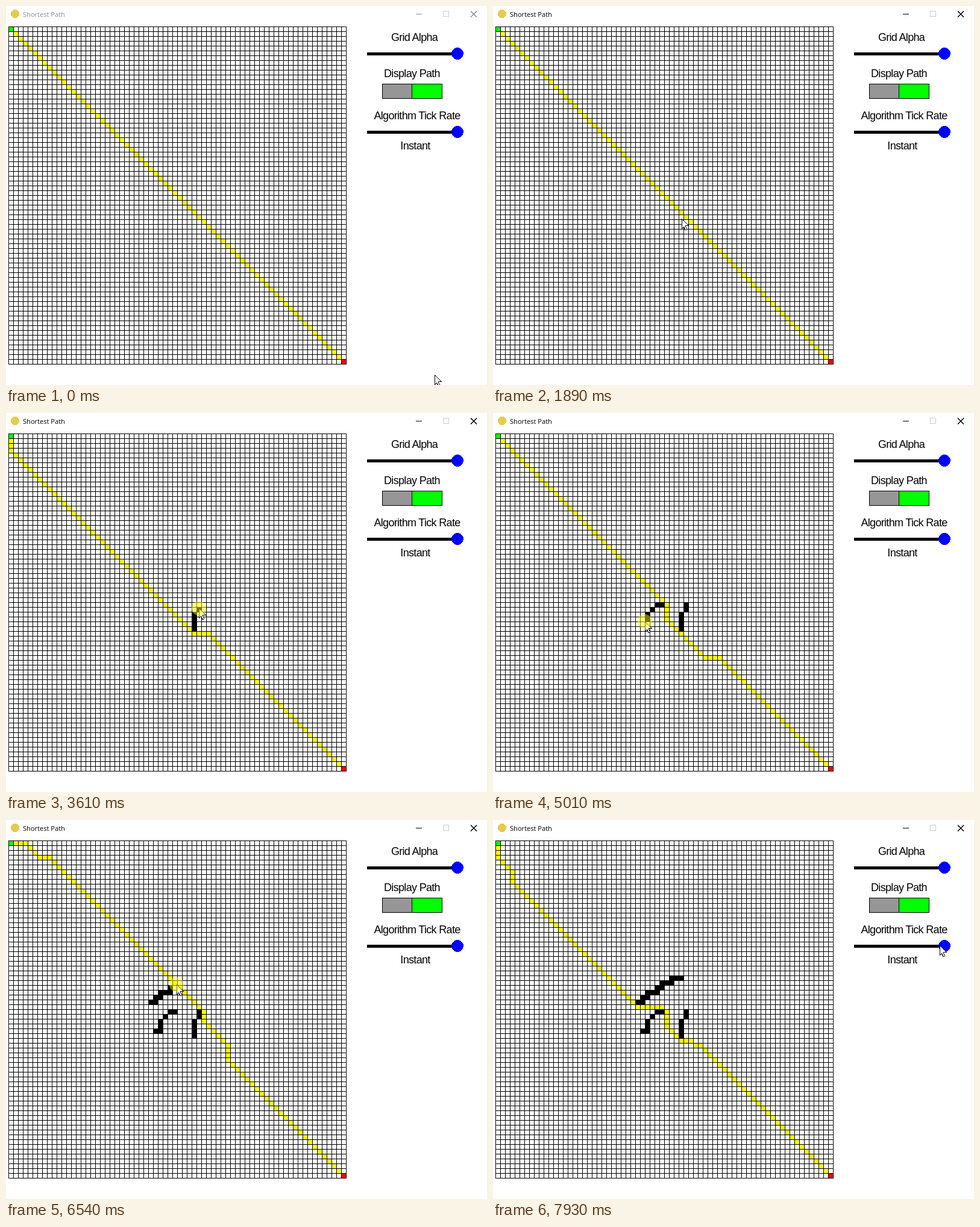
Recreate the animation shown at these times as an HTML page with a canvas. Size 798 by 629 pixels, loop 8000 ms.

```html
<!DOCTYPE html>
<html lang="en">
<head>
<meta charset="utf-8">
<title>Shortest Path</title>
<style>
  html, body { margin: 0; width: 798px; height: 629px; overflow: hidden; background: #fff; }
  svg, canvas { position: absolute; left: 0; top: 0; }
  svg { shape-rendering: crispEdges; }
  #bar { --ink: #000; }
  #bar.idle { --ink: #8c8c8c; }
  #title { font: 11.1px "Open Sans", "Noto Sans", sans-serif; fill: var(--ink); }
  #buttons { stroke: var(--ink); fill: none; }
  #labels { font: 18px "Liberation Sans", Arial, sans-serif; letter-spacing: -.68px; text-anchor: middle; }
  #halo { fill: rgba(255, 255, 0, .47); shape-rendering: auto; }
</style>
</head>
<body>
<canvas id="stage" width="798" height="629"></canvas>
<svg width="798" height="629">
  <g id="bar">
    <circle cx="15" cy="13" r="7" fill="#e6cb4c"/>
    <text id="title" x="28" y="18">Shortest Path</text>
    <g id="buttons">
      <path d="M680 13.5h10M771 8.5l10 10M781 8.5l-10 10"/>
      <rect x="725.5" y="8.5" width="9" height="9" stroke="#ccc"/>
    </g>
  </g>
  <g id="labels">
    <text x="677.5" y="58">Grid Alpha</text>
    <text x="673.5" y="118">Display Path</text>
    <text x="682" y="188">Algorithm Tick Rate</text>
    <text x="679" y="238">Instant</text>
  </g>
  <path d="M599 77h150v5h-150zM599 207h150v5h-150z"/>
  <circle cx="749" cy="79" r="10" fill="#00f"/>
  <circle cx="749" cy="209" r="10" fill="#00f"/>
  <g stroke="#000">
    <rect x="624.5" y="129.5" width="49" height="24" fill="#969696"/>
    <rect x="673.5" y="129.5" width="50" height="24" fill="#0f0"/>
  </g>
  <g id="pointer">
    <path d="M.5 .5v16l3-3 2.5 5h1.5l1-1-2-5v-1h5z" fill="#fff" stroke="#000"/>
    <circle id="halo" r="12"/>
  </g>
</svg>
<script>
const LOOP = 8000, LAST = 69, CELL = 8, LEFT = 4, TOP = 34;
const FOCUS = 1350, LAG = 130;
const $ = id => document.getElementById(id);
const g = $('stage').getContext('2d');

// Pointer key points: time, x, y
const keys = [
  [70, 711, 612], [870, 288, 352], [1020, 296, 362], [1350, 314, 353], [1890, 313, 353],
  [2230, 309, 358], [2430, 309, 358], [3050, 314, 344], [3458, 316, 330], [3610, 320, 324],
  [4030, 321, 316], [4430, 283, 318], [4603, 268, 322], [4723, 260, 330], [5010, 252, 346],
  [5250, 245, 353], [5640, 240, 303], [5770, 240, 303], [6540, 283, 273], [6880, 303, 262],
  [7140, 303, 262], [7680, 764, 226], [7930, 741, 208]
];

// Button held: from, to. The first press only focuses the window, the others draw walls.
const presses = [[FOCUS, 1620], [2430, 4030], [4430, 5300], [5770, 7160]];
const pressed = t => presses.some(([from, to]) => t >= from && t < to);

// Corners of the route once the given number of wall cells stands
const routes = [
  { walls: 0, corners: [] },
  { walls: 3, corners: [[1, 0], [39, 38], [39, 39]] },
  { walls: 4, corners: [[2, 0], [39, 37], [39, 39]] },
  { walls: 5, corners: [[0, 3], [38, 41], [41, 41]] },
  { walls: 9, corners: [[35, 35], [35, 38], [43, 46], [46, 46]] },
  { walls: 18, corners: [[3, 0], [6, 3], [8, 3], [40, 35], [40, 37], [45, 42], [45, 45]] },
  { walls: 23, corners: [[0, 3], [3, 6], [3, 8], [29, 34], [34, 34], [35, 35], [35, 38],
    [38, 41], [40, 41], [41, 42], [42, 42]] }
];

function pointer(t) {
  const i = keys.findIndex(k => k[0] > t);
  if (i <= 0) return keys.at(i).slice(1);
  const [t0, x0, y0] = keys[i - 1], [t1, x1, y1] = keys[i];
  let k = (t - t0) / (t1 - t0);
  if (!pressed(t)) k *= k * (3 - 2 * k);
  return [x0 + (x1 - x0) * k, y0 + (y1 - y0) * k];
}

// Every cell the held pointer crosses becomes a wall a moment later.
function traceWalls() {
  const walls = new Map();
  for (const [from, to] of presses.slice(1))
    for (let t = from; t < to; t += 5) {
      const [px, py] = pointer(t);
      const x = Math.floor((px - LEFT) / CELL), y = Math.floor((py - TOP) / CELL);
      const id = x + ',' + y;
      if (!walls.has(id)) walls.set(id, { x, y, time: t + LAG });
    }
  return [...walls.values()];
}
const walls = traceWalls();

function fillCell(x, y, color) {
  g.fillStyle = color;
  g.fillRect(LEFT + x * CELL, TOP + y * CELL, CELL + 1, CELL + 1);
}

function drawRoute(corners) {
  let x = 0, y = 0;
  for (const [cx, cy] of [...corners, [LAST, LAST]])
    while (x !== cx || y !== cy) {
      x += Math.sign(cx - x);
      y += Math.sign(cy - y);
      fillCell(x, y, '#ff0');
    }
  fillCell(0, 0, '#0f0');
  fillCell(LAST, LAST, '#f00');
}

function drawGrid() {
  const span = (LAST + 1) * CELL;
  g.fillStyle = '#000';
  for (let d = 0; d <= span; d += CELL) {
    g.fillRect(LEFT + d, TOP, 1, span + 1);
    g.fillRect(LEFT, TOP + d, span + 1, 1);
  }
}

function draw(now) {
  const t = now % LOOP;
  const standing = walls.filter(w => w.time <= t);
  g.clearRect(0, 0, 798, 629);
  drawRoute(routes.findLast(r => r.walls <= standing.length).corners);
  for (const w of standing) fillCell(w.x, w.y, '#000');
  drawGrid();
  $('bar').classList.toggle('idle', t < FOCUS);
  $('pointer').setAttribute('transform', `translate(${pointer(t).map(Math.round)})`);
  $('halo').style.display = pressed(t) ? '' : 'none';
  requestAnimationFrame(draw);
}
requestAnimationFrame(draw);
</script>
</body>
</html>
```
